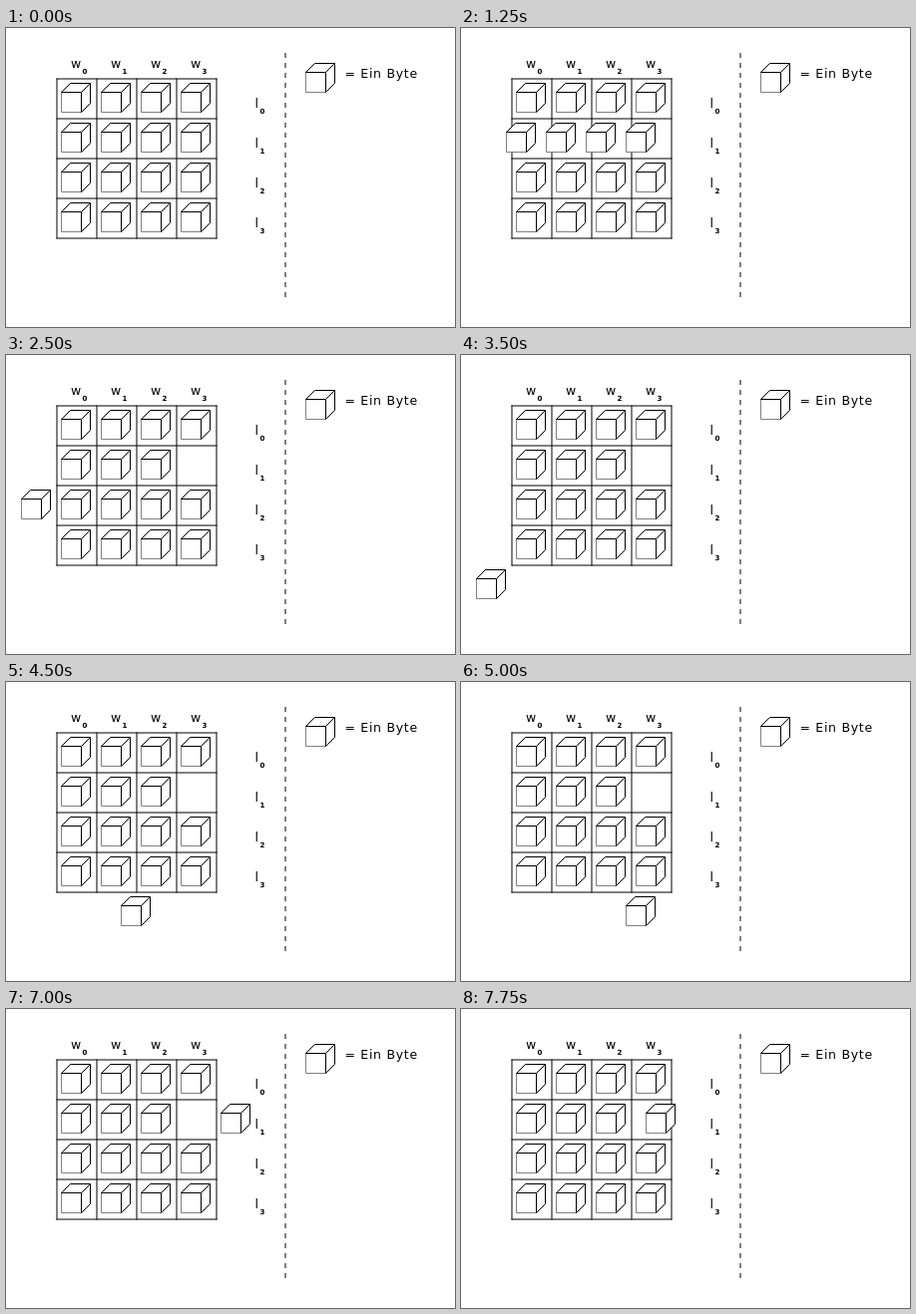
An HTML page that plays this animation: 450 px wide and 300 px high, repeating every 8000 ms.

```html
<!DOCTYPE html>
<html lang="de">
<head>
<meta charset="utf-8">
<title>Ein Byte</title>
<style>
html, body { margin: 0; width: 100%; height: 100%; overflow: hidden; background: #fff; }
svg { display: block; }
text { font: 12.5px "DejaVu Sans", sans-serif; letter-spacing: .7px; fill: #000; }
.sub { font-size: 7px; font-weight: bold; }
path { fill: none; stroke: #000; }
.body { fill: #fff; stroke: none; }
.soft { stroke: #808080; }
</style>
</head>
<body>
<svg id="stage" width="450" height="300" viewBox="0 0 450 300">
  <defs>
    <g id="cube">
      <path class="body" d="M0 9.5L9.5 0H30V20.5L20.5 30H0z"/>
      <path class="soft" d="M.5 9.5v20h20"/>
      <path d="M.5 9.5l9-9h20v20l-9 9v-20H.5M20.5 9.5l9-9"/>
    </g>
  </defs>
  <path id="grid"/>
  <path d="M280 25V270" stroke-dasharray="5 5"/>
  <text x="339.5" y="50">= Ein Byte</text>
</svg>
<script>
const stage = document.getElementById("stage");
const STEP = 250, LOOP = 8000, CELL = 40;

function add(tag, attrs, text = "") {
  const node = document.createElementNS("http://www.w3.org/2000/svg", tag);
  for (const key in attrs) node.setAttribute(key, attrs[key]);
  node.textContent = text;
  return stage.appendChild(node);
}

const addCube = (x, y) => add("use", { href: "#cube", x, y });

function addLabel(letter, index, x, y, gap) {
  add("text", { x, y }, letter);
  add("text", { x: x + gap, y: y + 5.5, class: "sub" }, index);
}

function place(cube, x, y) {
  cube.setAttribute("x", x);
  cube.setAttribute("y", y);
}

let lines = "";
for (let i = 0; i <= 4; i++) {
  const p = 51 + i * CELL;
  lines += `M50.5 ${p}H211.5M${p} 50.5V211.5`;
}
document.getElementById("grid").setAttribute("d", lines);

addCube(300, 35);
const rowCubes = [];
for (let i = 0; i < 4; i++) {
  addLabel("w", i, 65 + i * CELL, 40, 11.5);
  addLabel("l", i, 249.5, 80 + i * CELL, 5);
  for (let col = 0; col < 4; col++) {
    const cube = addCube(55 + col * CELL, 55 + i * CELL);
    if (i === 1) rowCubes.push(cube);
  }
}

// Distance the row has moved to the left.
const shift = step => Math.max(0, Math.min(step - 4, 4)) * 10;

// The first byte leaves on the left, goes round below and re-enters on the right.
function firstPos(step) {
  if (step >= 28) return [215 - (step - 28) * 10, 95];
  if (step >= 14) return [Math.min(15 + (step - 14) * 25, 215), 215];
  if (step >= 8) return [15, 95 + (step - 8) * 20];
  return [55 - shift(step), 95];
}

function draw(time) {
  const step = Math.floor(time % LOOP / STEP);
  rowCubes.forEach((cube, col) => {
    if (col) place(cube, 55 + col * CELL - shift(step), 95);
    else place(cube, ...firstPos(step));
  });
}

const start = performance.now();
function tick() {
  draw(performance.now() - start);
  requestAnimationFrame(tick);
}
tick();
</script>
</body>
</html>
```
